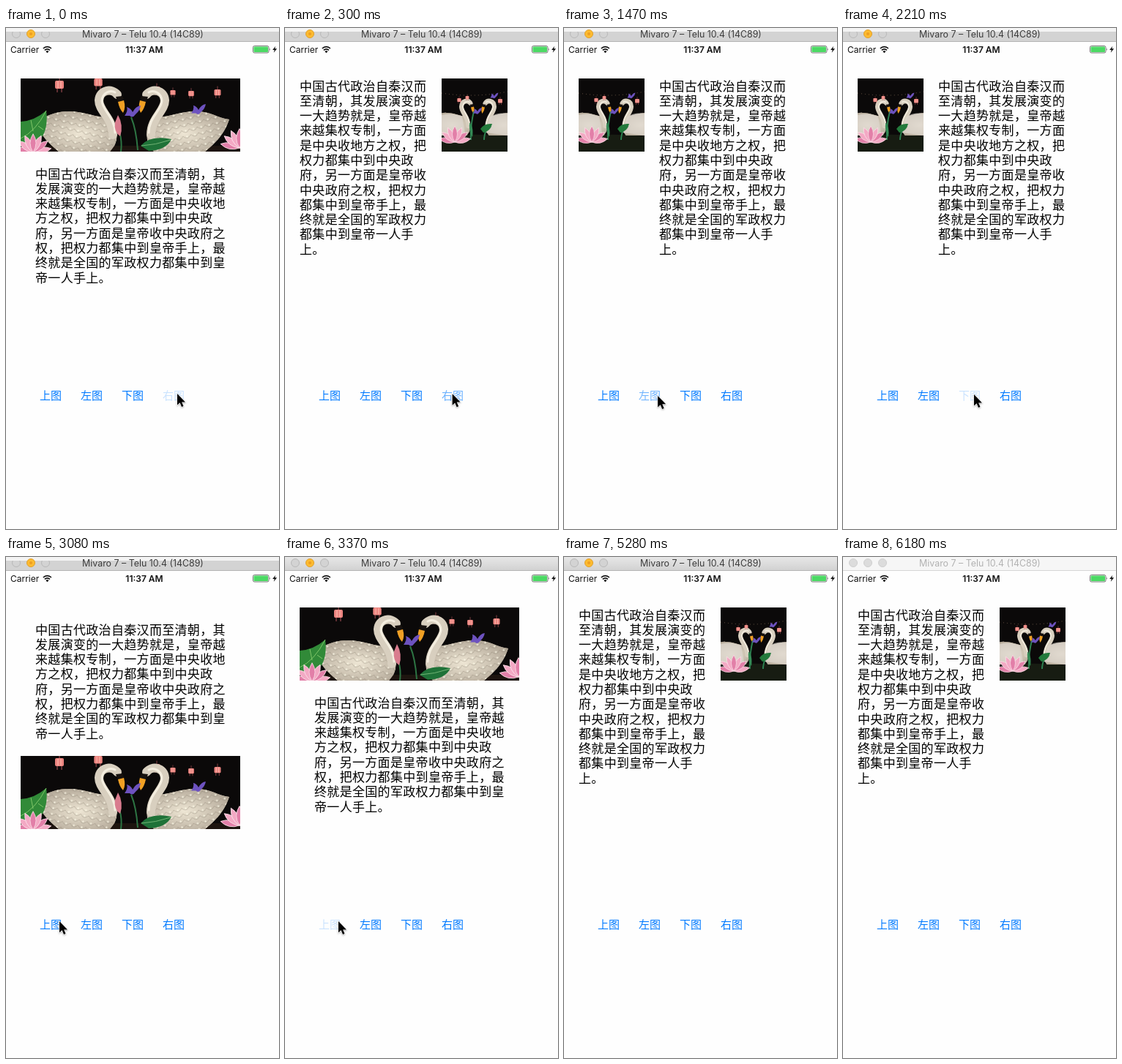
Recreate the animation shown at these times as an HTML page. Size 373 px wide and 685 px high, loop 6.28 s.

```html
<!DOCTYPE html>
<html lang="zh-CN">
<head>
<meta charset="utf-8">
<title>图文布局</title>
<style>
html, body { margin: 0; width: 100%; height: 100%; overflow: hidden; background: #fefefe; }
#stage { position: relative; width: 373px; height: 685px; overflow: hidden; background: #fefefe; }
#stage > * { position: absolute; }
svg { display: block; }
#bar { left: 0; top: 0; width: 373px; height: 18px; background: linear-gradient(#e7e7e7, #d2d2d2);
  border-bottom: 1px solid #b4b4b4; }
#bar.worn { background: linear-gradient(#f4f4f4 5px, #d3d3d3 5px); }
#bar.idle { background: #f6f6f6; border-color: #d6d6d6; }
#bar svg { position: absolute; left: 0; top: 0; }
#bar .dot { fill: #d3d3d3; stroke: #b9b9b9; }
#bar .mid { fill: #fdbb2f; stroke: #e0a02e; }
#bar .worn-top { display: none; fill: #f4f4f4; }
#bar.worn .worn-top { display: block; }
#bar.idle .dot, #bar.idle .mid { fill: #dcdcdc; stroke: #d0d0d0; }
#bar.idle .core { display: none; }
#title { position: absolute; left: 0; width: 374px; top: 0; text-align: center; white-space: pre;
  font: 12.4px/17px Inter, Roboto, sans-serif; color: #3c3c3c; }
#bar.idle #title { color: #b2b2b2; }
.status { top: 20px; font: 12px/19px Inter, Roboto, sans-serif; color: #111; white-space: pre; }
.cjk { font-family: "Noto Sans CJK SC", "Noto Sans CJK JP", "Noto Sans CJK", sans-serif; text-spacing-trim: space-all; }
#copy { font-size: 17px; line-height: 20.3px; letter-spacing: .32px; color: #000; }
.btn { top: 492px; font-size: 15px; line-height: 20px; color: #007aff; white-space: pre; }
</style>
</head>
<body>
<div id="stage">
  <div id="bar">
    <svg width="373" height="18">
      <circle class="dot" cx="14" cy="8" r="5.5"/>
      <circle class="dot" cx="54" cy="8" r="5.5"/>
      <rect class="worn-top" width="373" height="5"/>
      <circle class="mid" cx="34" cy="8" r="5.5"/>
      <circle class="core" cx="34" cy="8" r="2" fill="#ee9d22"/>
    </svg>
    <div id="title">Mivaro 7 – Telu 10.4 (14C89)</div>
  </div>

  <div class="status" style="left:6px">Carrier</div>
  <svg style="left:50px;top:24px" width="13" height="11" fill="none" stroke="#111" stroke-width="1.7">
    <path d="M.9 4A7.6 7.6 0 0 1 11.9 4M2.9 6.3A4.8 4.8 0 0 1 9.9 6.3"/>
    <path d="M6.4 10.2L4.3 8A3 3 0 0 1 8.5 8Z" fill="#111" stroke="none"/>
  </svg>
  <div class="status" style="left:139px;width:100px;text-align:center;font-weight:600">11:37 AM</div>
  <svg style="left:337px;top:24px" width="36" height="11">
    <rect x=".5" y=".5" width="21.5" height="9.5" rx="2" fill="none" stroke="#555" stroke-width=".8"/>
    <rect x="1.5" y="1.5" width="19.5" height="7.5" rx="1" fill="#4cd964"/>
    <path d="M23 3.5Q24.6 5.2 23 7Z" fill="#555"/>
    <path d="M31.3 .8L27.2 6H29.8L28.8 9.8L33.2 4.3H30.4Z" fill="#111"/>
  </svg>

  <svg id="wide" width="300" height="100" viewBox="0 0 300 100">
    <defs>
      <radialGradient id="glow" cx=".55" cy=".55" r=".6">
        <stop offset="0" stop-color="#eee6d4"/>
        <stop offset="1" stop-color="#b3a898"/>
      </radialGradient>
      <pattern id="plume" width="11" height="8" patternUnits="userSpaceOnUse" patternTransform="rotate(14)">
        <path d="M0 1Q5.5 8 11 1" fill="none" stroke="#857b6c" stroke-width=".7" opacity=".6"/>
        <circle cx="5.5" cy="2.5" r="1.2" fill="#fffbea" opacity=".8"/>
      </pattern>
      <g id="swan">
        <path id="body" d="M19 56C36 54 45 44 66 45C84 45 97 51 113 53C129 61 136 77 128 92L122 100H52C42 91 27 80 19 56Z" fill="url(#glow)"/>
        <use href="#body" style="fill:url(#plume)"/>
        <path d="M19 56C36 54 45 44 66 45C84 45 97 51 113 53C129 61 136 77 128 92L122 100H52C42 91 27 80 19 56Z" fill="url(#plume)"/>
        <path d="M132 22C125 13 108 15 107 30C107 45 126 54 126 77" fill="none" stroke="#d8cfbf" stroke-width="12" stroke-linecap="round"/>
        <path d="M129 19C122 15 111 20 111 31C112 44 129 54 129 74" fill="none" stroke="#f4eee0" stroke-width="3" stroke-linecap="round"/>
        <path d="M130 25L139 24L142 31L133 33Z" fill="#17120f"/>
        <path d="M133 32L141 30Q144 40 140 47Q135 42 133 32Z" fill="#f0a024"/>
      </g>
      <g id="pair">
        <use href="#swan"/>
        <use href="#swan" transform="matrix(-1 0 0 1 304 0)"/>
      </g>
      <g id="lamp">
        <path d="M0 -6V0M-3 11V16M3 11V16" stroke="#b0545a"/>
        <rect x="-6" width="12" height="11" rx="2" fill="#ec8480"/>
        <path d="M-2 1V10M2 1V10" stroke="#ffc0b0"/>
      </g>
      <g id="lotus"></g>
      <path id="iris" d="M-11 5Q-6 -2 -8 -7Q-2 -5 0 0Q4 -8 11 -9Q10 -2 4 3Q0 9 -4 5Z" fill="#6d52bf"/>
    </defs>
    <rect width="300" height="100" fill="#0b0909"/>
    <rect y="92" width="300" height="8" fill="#1d140f"/>
    <g id="lamps"></g>
    <use href="#pair"/>
    <path d="M151 53Q158 70 160 98M134 70Q139 84 137 100" fill="none" stroke="#2d7443" stroke-width="2"/>
    <use href="#iris" transform="translate(153 46)"/>
    <use href="#iris" transform="translate(243 43) scale(.9)"/>
    <path d="M133 50Q141 64 136 79Q127 73 129 60Z" fill="#d97c8e"/>
    <path d="M0 59Q19 58 35 44Q38 68 28 82Q16 92 0 91Z" fill="#318a38"/>
    <path d="M0 82Q20 73 35 44M17 72L14 57M24 65L31 70" fill="none" stroke="#7fc568"/>
    <path d="M164 92Q177 77 206 83Q199 98 175 99Z" fill="#1f7238"/>
    <path d="M165 92Q184 91 205 84" fill="none" stroke="#71b375"/>
    <use href="#lotus" transform="translate(17 101) scale(1.15)"/>
    <use href="#lotus" transform="translate(299 95) scale(1.2)"/>
  </svg>

  <svg id="small" width="90" height="100" viewBox="0 0 90 100">
    <rect width="90" height="100" fill="#0b0909"/>
    <path d="M0 80Q40 74 90 79V100H0Z" fill="#171c12"/>
    <path d="M0 20Q45 27 90 18" fill="none" stroke="#6d5948" stroke-dasharray="1 4"/>
    <use href="#pair" transform="matrix(.5 0 0 .56 -26.5 21.7)"/>
    <path d="M0 50Q13 46 28 52L32 75L0 78ZM90 48Q76 46 66 53L60 74L90 78Z" fill="#ddd6ce" opacity=".75"/>
    <g id="minis"></g>
    <path d="M44 45Q39 65 40 84M61 70Q58 78 58 84" fill="none" stroke="#2c8050" stroke-width="2"/>
    <path d="M53 69Q58 61 69 62Q67 72 57 74Z" fill="#237a3c"/>
    <path d="M38 60Q44 66 42 80Q37 74 38 60Z" fill="#348a55"/>
    <use href="#iris" transform="translate(49 45) scale(.55)"/>
    <use href="#iris" transform="translate(72 24) scale(.5)"/>
    <use href="#lotus" transform="translate(18 87)"/>
  </svg>

  <div id="copy" class="cjk">中国古代政治自秦汉而至清朝，其发展演变的一大趋势就是，皇帝越来越集权专制，一方面是中央收地方之权，把权力都集中到中央政府，另一方面是皇帝收中央政府之权，把权力都集中到皇帝手上，最终就是全国的军政权力都集中到皇帝一人手上。</div>

  <svg id="cursor" style="left:0;top:0;overflow:visible" width="12" height="19">
    <path d="M0 0V15.5L3.6 12.3L6 18L8.5 17L6.1 11.4H11Z" fill="#000" stroke="#fff" stroke-width="1.1"
      paint-order="stroke" style="filter:drop-shadow(0 1px 1px rgba(0,0,0,.3))"/>
  </svg>
</div>
<script>
const LOOP = 6280, TICK = 146.4, FADE = 300;
const $ = id => document.getElementById(id);
const stage = $('stage'), bar = $('bar'), copy = $('copy'), cursor = $('cursor');

// Petals and lanterns
$('lotus').innerHTML = [-78, 78, -52, 52, -26, 26, 0].map((a, i) =>
  `<path d="M0 0Q-7 -11 0 -22Q7 -11 0 0Z" transform="rotate(${a})" fill="${i % 3 ? '#f3a9c4' : '#e27fa8'}" stroke="#fbe0e8" stroke-width=".7"/>`
).join('');
const lamps = (id, list) => {
  $(id).innerHTML = list.map(([x, y, s]) =>
    `<use href="#lamp" transform="translate(${x} ${y}) scale(${s})"/>`).join('');
};
lamps('lamps', [[53, 3, 1], [106, 0, .95], [186, 11, .75], [208, 16, .6], [233, 17, .65], [269, 15, .75]]);
lamps('minis', [[24, 27, .45], [35, 24, .4], [80, 28, .5]]);

const buttons = ['上图', '左图', '下图', '右图'].map((label, i) => {
  const b = document.createElement('div');
  b.className = 'btn cjk';
  b.textContent = label;
  b.style.left = 46 + 56 * i + 'px';
  stage.insertBefore(b, cursor);
  return b;
});

const layouts = {
  up:    { pic: 'wide',  at: [20, 69],    text: [40, 188.5, 263] },
  right: { pic: 'small', at: [213.5, 69], text: [20, 68.5, 176] },
  left:  { pic: 'small', at: [20, 69],    text: [130, 68.5, 176] },
  down:  { pic: 'wide',  at: [20, 271.5], text: [40, 88.5, 263] }
};
const scenes = [[0, 'up'], [150, 'right'], [1330, 'left'], [2350, 'down'], [3370, 'up'], [4540, 'right']];
// button, pressed at, released at
const taps = [[3, 0, 150], [1, 1180, 1330], [2, 2210, 2350], [0, 3370, 3370], [3, 4400, 4540]];
// start, end, from, to
const moves = [
  [150, 1150, [234, 500], [125, 503]],
  [1330, 2190, [125, 503], [179, 501]],
  [2350, 3070, [179, 501], [73, 498]],
  [3370, 4380, [73, 498], [225, 498]],
  [4540, 5270, [225, 498], [333, 691]]
];

const clamp = v => Math.max(0, Math.min(1, v));
const ease = p => (1 - Math.cos(Math.PI * p)) / 2;

function place(el, [x, y]) {
  el.style.transform = `translate(${x}px, ${y}px)`;
}

function showScene(t) {
  const { pic, at, text } = layouts[scenes.filter(s => s[0] <= t).pop()[1]];
  for (const id of ['wide', 'small']) $(id).style.visibility = id === pic ? 'visible' : 'hidden';
  $(pic).style.left = at[0] + 'px';
  $(pic).style.top = at[1] + 'px';
  copy.style.left = text[0] + 'px';
  copy.style.top = text[1] + 'px';
  copy.style.width = text[2] + 'px';
}

function showButtons(t, held) {
  const alpha = [1, 1, 1, 1];
  for (const [i, down, up] of taps) {
    if (t < down) continue;
    alpha[i] = t < up ? .2 : .2 + .8 * clamp((held - up) / FADE);
  }
  buttons.forEach((b, i) => { b.style.opacity = alpha[i]; });
}

function showCursor(held) {
  const [start, end, a, b] = moves.filter(m => m[0] <= held).pop() || moves[0];
  const p = ease(clamp((held - start) / (end - start)));
  place(cursor, a.map((v, i) => v + (b[i] - v) * p));
}

function draw(t) {
  const held = Math.floor(t / TICK) * TICK; // the screen is sampled about seven times a second
  showScene(t);
  showButtons(t, held);
  showCursor(held);
  bar.className = t < 3370 ? 'worn' : t < 6180 ? '' : 'idle';
}

const begin = performance.now();
function frame() {
  draw((performance.now() - begin) % LOOP);
  requestAnimationFrame(frame);
}
frame();
</script>
</body>
</html>
```
